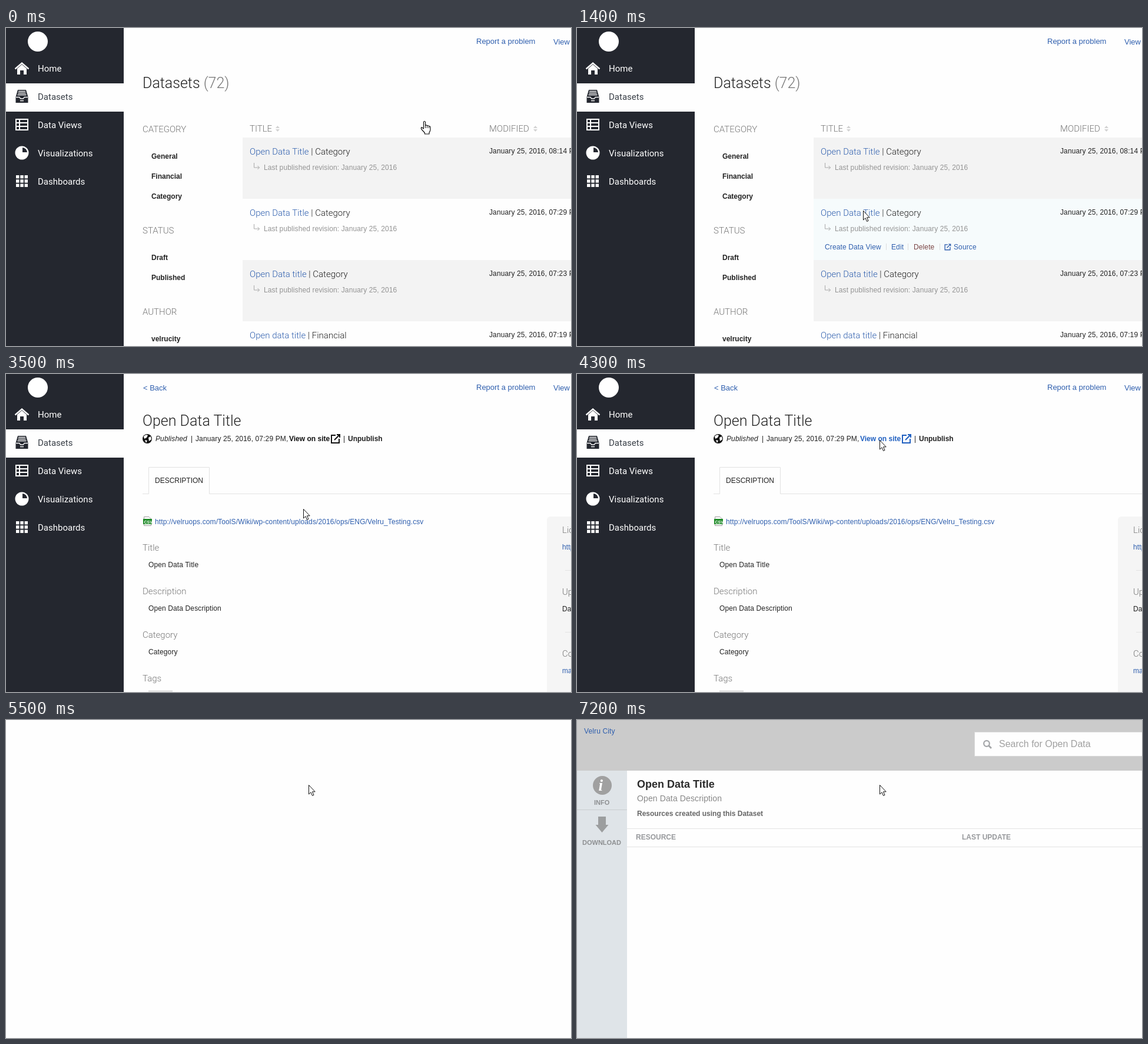
These frames come from a looping animation (960 px wide and 540 px high, 8100 ms). An HTML page:

```html
<!DOCTYPE html>
<html lang="en">
<head>
<meta charset="utf-8">
<title>Dataset publishing walkthrough</title>
<style>
html, body { margin: 0; width: 100%; height: 100%; overflow: hidden; background: #fefefe; }
svg { display: block; width: 960px; height: 540px; }
text { font-family: "Liberation Sans", Arial, sans-serif; font-size: 12px; fill: #222; white-space: pre; }
.nav { font: 15px Roboto, sans-serif; fill: #fff; }
.head { font: 300 25px Roboto, sans-serif; fill: #222; }
.label { font: 300 15px Roboto, sans-serif; fill: #777; }
.row { font: 300 15px Roboto, sans-serif; fill: #222; }
.a { fill: #2f5fae; }
.top { font-size: 13px; fill: #2f5fae; }
.b { font-weight: bold; }
.s { letter-spacing: .12px; }
.mute { fill: #949494; letter-spacing: .12px; }
.tag { font-size: 11px; font-weight: bold; fill: #8d8f91; }
</style>
</head>
<body>
<svg id="stage" viewBox="0 0 960 540"></svg>
<script>
const LOOP = 8100, STEP = 100;
const NAME = 'Velru', SLUG = NAME.toLowerCase();

const text = (x, y, s, cls = '', extra = '') => `<text x="${x}" y="${y}" class="${cls}" ${extra}>${s}</text>`;
const rect = (x, y, w, h, fill, extra = '') => `<rect x="${x}" y="${y}" width="${w}" height="${h}" fill="${fill}" ${extra}/>`;
const path = (d, extra = '') => `<path d="${d}" ${extra}/>`;
const line = (d, color, w = 1) => path(d, `fill="none" stroke="${color}" stroke-width="${w}"`);
const group = (id, body) => `<g id="${id}">${body}</g>`;

function sidebar() {
  const names = ['Home', 'Datasets', 'Data Views', 'Visualizations', 'Dashboards'];
  let grid = '';
  for (let i = 0; i < 9; i++) grid += rect(17 + i % 3 * 7.3, 250 + Math.floor(i / 3) * 7.3, 5.4, 5.4, '#fff');
  return rect(0, 0, 200, 540, '#24272f') +
    '<circle cx="54" cy="23" r="17" fill="#fff"/>' +
    rect(0, 94, 200, 48, '#fefefe', 'id="active"') +
    names.map((s, i) => text(54, 74 + i * 48, s, 'nav', i == 1 ? 'id="current"' : '')).join('') +
    path('M19 69 27 62 35 69V79H30V72H24V79H19Z', 'fill="#fff"') +
    line('M15.5 69.5 27 59.5 38.5 69.5', '#fff', 2.4) +
    `<g id="drawer">${path('M20 105H34L37.500 117V127H16.500V117Z')}
      <g id="slots" fill="none" stroke-width="1.300">${path('M21 107.500H33M20.500 110.500H33.500M19.500 113.500H34.500M17 117.500H23L24.500 120H29.500L31 117.500H37M24 123.500H30')}</g></g>` +
    line('M17 155H37V173H17ZM17 161H37M17 167H37M23 155V173', '#fff', 2) +
    '<circle cx="27" cy="212" r="11.500" fill="#fff"/>' +
    path('M28 203A8.500 8.500 0 0 1 36 211H28Z', 'fill="#24272f"') + grid;
}

const topLinks = text(799, 27, 'Report a problem', 'top') + text(930, 28, 'View', 'top');

const openIcon = (x, y, k, w, color) =>
  `<g transform="translate(${x} ${y}) scale(${k})">${line('M8 2H1V15H14V8M6 10 14 2M10 1H15V6', color, w)}</g>`;

const sorter = x => path(`M${x} 170L${x + 3.500} 166 ${x + 7} 170ZM${x} 172L${x + 3.500} 176 ${x + 7} 172Z`, 'fill="#d2d2d2"');

function row(i, title, category, time) {
  const y = 186 + i * 104;
  const seps = [525.5, 562.5, 616.5].map(x => line(`M${x} ${y + 76}v11`, '#dcdcdc')).join('');
  return rect(402, y, 558, 104, i % 2 ? '#fefefe' : '#f3f3f3') +
    group('hover' + i,
      rect(402, y, 558, 104, '#f6fbfc') +
      text(421, y + 86, 'Create Data View', 'a s') + text(534, y + 86, 'Edit', 'a s') +
      text(572, y + 86, 'Delete', 's', 'style="fill:#7a4545"') + text(640, y + 86, 'Source', 'a s') +
      seps + openIcon(624.5, y + 76.5, .68, 2, '#2f5fae')) +
    text(414, y + 29, `<tspan class="a">${title}</tspan> | ${category}`, 'row') +
    line(`M421.500 ${y + 43}v8h9m-3 -3l3 3l-3 3`, '#a9a9a9') +
    text(438, y + 55, 'Last published revision: January 25, 2016', 'mute') +
    text(821, y + 27, `January 25, 2016, ${time} PM`, 's');
}

function listPage() {
  const labels = [['CATEGORY', 177], ['STATUS', 349], ['AUTHOR', 487]];
  const filters = [['General', 222], ['Financial', 256], ['Category', 290], ['Draft', 394], ['Published', 428], [SLUG + 'city', 532]];
  return topLinks +
    text(232, 102, 'Datasets <tspan fill="#777">(72)</tspan>', 'head') +
    labels.map(([s, y]) => text(232, y, s, 'label')).join('') +
    filters.map(([s, y]) => text(247, y, s, 'b')).join('') +
    text(414, 176, 'TITLE', 'label') + sorter(458) +
    text(821, 176, 'MODIFIED', 'label') + sorter(896) +
    row(0, 'Open Data Title', 'Category', '08:14') +
    row(1, 'Open Data Title', 'Category', '07:29') +
    row(2, 'Open Data title', 'Category', '07:23') +
    row(3, 'Open data title', 'Financial', '07:19');
}

const viewLink = (id, color) => group(id,
  text(481, 114, 'View on site', 'b', `style="fill:${color}"`) + openIcon(552, 102, 1, 2, color));

function detailPage() {
  const fields = [['Title', 'Open Data Title'], ['Description', 'Open Data Description'], ['Category', 'Category'], ['Tags', '']];
  const side = [['License', 'http://', 'a'], ['Updated', 'Daily', ''], ['Contact', 'mail', 'a']];
  return topLinks + text(233, 28, '&lt; Back', 'top') +
    text(232, 88, 'Open Data Title', 'head') +
    '<circle cx="240" cy="110" r="8" fill="#111"/>' +
    path('M234 106Q237 102 241 104L239 108 235 110ZM242 108L246 106 247 111 243 114ZM236 112L240 113 238 117Z', 'fill="#fff"') +
    text(254, 114, 'Published', 's', 'font-style="italic"') +
    text(314, 114, '|') + text(322, 114, 'January 25, 2016, 07:29 PM,', 's') +
    viewLink('view', '#111') + viewLink('viewHot', '#1f5fc0') +
    text(573, 114, '|') + text(581, 114, 'Unpublish', 'b') +
    line('M232 203.500H242.500V158.500H345.500V203.500H960', '#e2e2e2') +
    text(253, 185, 'DESCRIPTION') +
    path('M234.500 242.500H243L246.500 246V257.500H234.500Z', 'fill="#fff" stroke="#9a9a9a"') +
    rect(233, 246, 15, 9, '#1c8a26') +
    text(234.5, 253.5, 'CSV', 'b', 'style="font-size:7px;fill:#fff"') +
    text(253, 255, `http://${SLUG}ops.com/ToolS/Wiki/wp-content/uploads/2016/ops/ENG/${NAME}_Testing.csv`, 'a s') +
    fields.map(([k, v], i) => text(232, 300 + i * 74, k, 'label') + text(242, 328 + i * 74, v, 's')).join('') +
    rect(242, 537, 41, 3, '#e4e4e4') +
    rect(919, 242, 60, 320, '#f5f5f5', 'rx="6"') +
    side.map(([k, v, c], i) => text(945, 270 + i * 105, k, 'label') + text(945, 298 + i * 105, v, c + ' s')).join('') +
    line('M950 333.500H960M950 438.500H960', '#e3e3e3');
}

function publicPage() {
  const full =
    rect(0, 86, 85, 454, '#dfe4e8') +
    '<circle cx="43" cy="111" r="16" fill="#a0a0a0"/>' +
    text(36.5, 120, 'i', '', 'style="font:italic bold 27px Liberation Serif,serif;fill:#fff"') +
    path('M36 164H49V178H53.500L42.500 191 31.500 178H36Z', 'fill="#9c9e9f"') +
    line('M0 152.500H85', '#c9cdd0') +
    '<circle cx="696" cy="40" r="4.800" fill="none" stroke="#a3a5a8" stroke-width="2.200"/>' +
    line('M699.500 43.500 704 48', '#a3a5a8', 2.8) +
    text(102, 115, 'Open Data Title', 'b', 'style="font-size:18px;fill:#2b2b2b"') +
    text(102, 138, 'Open Data Description', 's', 'style="font-size:14px;fill:#888"') +
    text(102, 163, 'Resources created using this Dataset', 'b', 'style="fill:#666"') +
    line('M85 184.500H960M85 215.500H960', '#e3e3e3') +
    text(100, 203, 'RESOURCE', 'b', 'style="fill:#97999c"') +
    text(654, 203, 'LAST UPDATE', 'b', 'style="fill:#97999c"');
  return rect(0, 0, 960, 86, '#cbcbcb') +
    rect(675.5, 20.5, 300, 41, '#fefefe', 'stroke="#d8d8d8"') +
    text(12, 23, NAME + ' City', 'a s') +
    text(717, 46, 'Search for Open Data', '', 'style="font-size:16px;fill:#a0a0a0"') +
    group('partial', line('M0 152.500H80', '#c6c6c6', 1.5)) +
    group('full', full) +
    text(29, 144, 'INFO', 'tag') + text(9, 212, 'DOWNLOAD', 'tag');
}

const cursor = group('cursor',
  group('arrow', path('M.5 .5V16L4 12.700 6.500 18.500 9 17.400 6.500 11.800H11.200Z', 'fill="#fff" stroke="#111"')) +
  group('hand', path('M4.500 14V2.500Q6 0 7.500 2.500V8.500Q9.500 7 10.500 9Q12.500 8 13.500 10Q15.800 9.500 16 11.500V16Q15.500 19 14 20.500V23H6.500V21L1 15Q-.5 12 1.500 11.700Z',
    'fill="#fff" stroke="#111" stroke-width="1.200" stroke-linejoin="round"') + line('M7.500 8V13M10.500 9.500V13M13.500 10.500V13', '#111')));

const stage = document.getElementById('stage');
stage.innerHTML = rect(0, 0, 960, 540, '#fefefe') + group('list', listPage()) + group('detail', detailPage()) +
  group('public', publicPage()) + group('side', sidebar()) + cursor;

const el = {};
stage.querySelectorAll('[id]').forEach(n => el[n.id] = n);
const show = (id, on) => el[id].style.display = on ? '' : 'none';

const ease = {
  in: p => p * p,
  line: p => p,
  out: p => 1 - (1 - p) ** 3,
  both: p => (1 - Math.cos(Math.PI * p)) / 2
};

// start, end, from, to, easing
const moves = [
  [0, 1400, [705, 157], [486, 310], ease.both],
  [2900, 3500, [486, 310], [505, 229], ease.in],
  [3500, 3800, [505, 229], [509, 157], ease.line],
  [3800, 4600, [509, 157], [514, 110], ease.out]
];

function cursorAt(t) {
  const [t0, t1, a, b, f] = moves.filter(m => t >= m[0]).pop();
  const k = f(Math.min(1, (t - t0) / (t1 - t0)));
  return a.map((v, i) => Math.round(v + (b[i] - v) * k));
}

function draw(now) {
  const t = Math.floor(now % LOOP / STEP) * STEP;
  const [x, y] = cursorAt(t);
  const onList = t < 2400, onDetail = t >= 2600 && t < 5300;

  show('list', onList);
  show('detail', onDetail);
  show('public', t >= 6200);
  show('partial', t < 6300);
  show('full', t >= 6300);

  const active = onList || onDetail;
  show('side', t < 5300);
  show('active', active);
  el.current.style.fill = active ? '#3a4048' : '#fff';
  el.drawer.setAttribute('fill', active ? '#24272f' : '#fff');
  el.slots.setAttribute('stroke', active ? '#fff' : '#24272f');

  const over = Math.floor((y - 186) / 104);
  for (let i = 0; i < 4; i++) show('hover' + i, i === over);
  const hot = y <= 118;
  show('view', !hot);
  show('viewHot', hot);

  const hand = onList && y < 186;
  show('hand', hand);
  show('arrow', !hand);
  el.cursor.setAttribute('transform', `translate(${x} ${y})`);
}

const start = performance.now();
function tick() {
  draw(performance.now() - start);
  requestAnimationFrame(tick);
}
tick();
</script>
</body>
</html>
```
